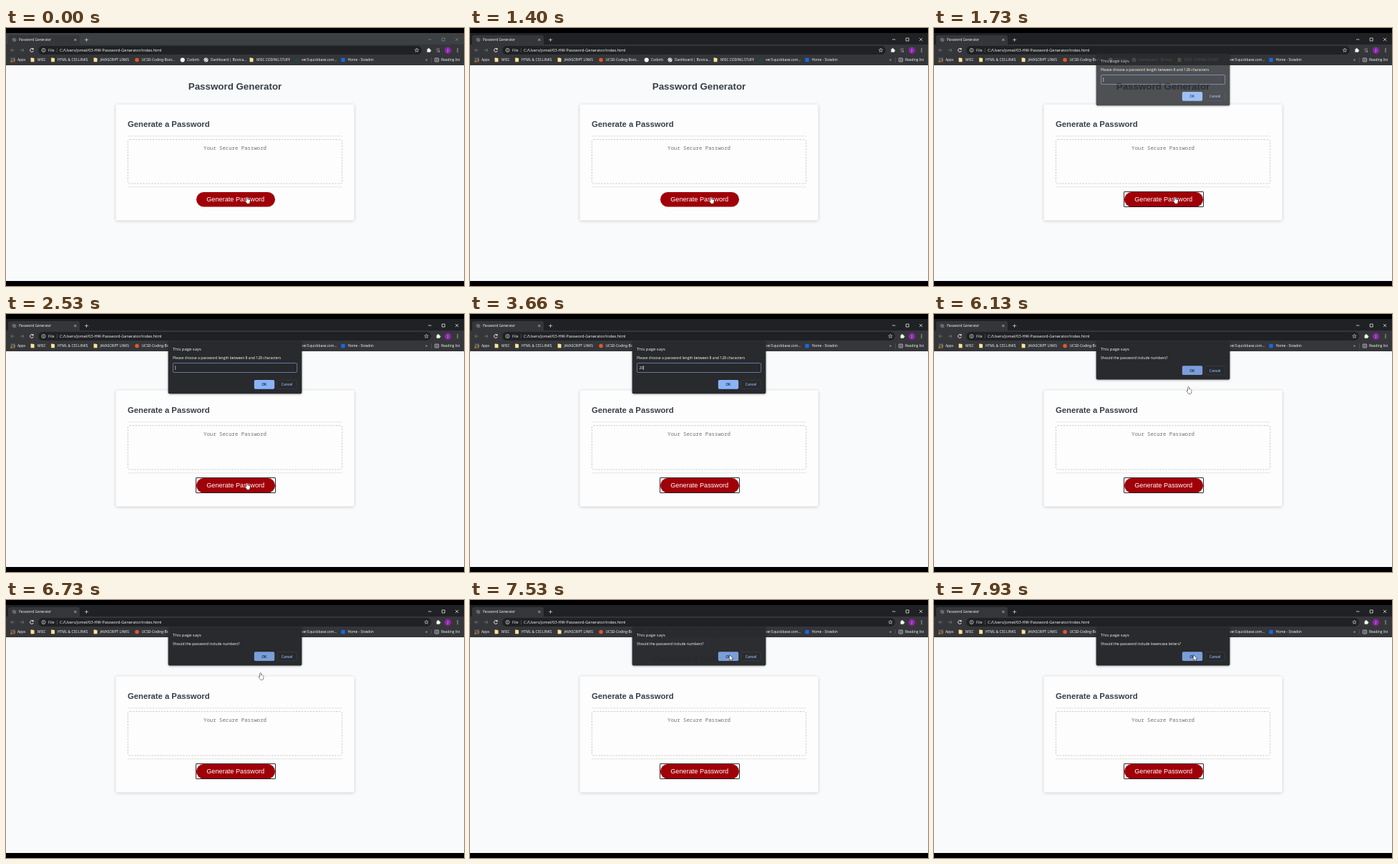
An HTML page with a canvas that plays this animation: 640 px wide and 360 px high, repeating every 8 s.

```html
<!DOCTYPE html>
<html lang="en">
<head>
<meta charset="utf-8">
<title>Password Generator</title>
<style>
html, body { margin: 0; width: 100%; height: 100%; overflow: hidden; background: #000; }
canvas { display: block; width: 640px; height: 360px; }
</style>
</head>
<body>
<canvas id="stage"></canvas>
<script>
const LOOP = 8000;
const UI = '"Open Sans", "Noto Sans", sans-serif';
const ARIAL = '"Liberation Sans", Arial, sans-serif';
const MONO = '"Noto Sans Mono", "DejaVu Sans Mono", monospace';

const ratio = window.devicePixelRatio || 1;

function prepare(canvas) {
  canvas.width = 640 * ratio;
  canvas.height = 360 * ratio;
  const context = canvas.getContext('2d');
  context.scale(ratio, ratio);
  return context;
}

const stage = prepare(document.getElementById('stage'));
const layer = prepare(document.createElement('canvas'));
let ctx = stage;

const clamp = v => Math.max(0, Math.min(1, v));
const ease = v => v * v * (3 - 2 * v);
const lerp = (a, b, p) => a + (b - a) * p;

function rect(x, y, w, h, color) {
  ctx.fillStyle = color;
  ctx.fillRect(x, y, w, h);
}

function box(x, y, w, h, r, fill, stroke, width = 0.7) {
  ctx.beginPath();
  ctx.roundRect(x, y, w, h, r);
  if (fill) { ctx.fillStyle = fill; ctx.fill(); }
  if (stroke) { ctx.strokeStyle = stroke; ctx.lineWidth = width; ctx.stroke(); }
}

function shadowBox(x, y, w, h, r, fill, shade, blur) {
  ctx.save();
  ctx.shadowColor = `rgba(0,0,0,${shade})`;
  ctx.shadowBlur = blur * ratio;
  ctx.shadowOffsetY = 0.7 * ratio;
  box(x, y, w, h, r, fill);
  ctx.restore();
}

function disc(x, y, r, fill) {
  ctx.beginPath();
  ctx.arc(x, y, r, 0, 7);
  ctx.fillStyle = fill;
  ctx.fill();
}

function ring(x, y, r, color, width = 0.7, from = 0, to = 7) {
  ctx.beginPath();
  ctx.arc(x, y, r, from, to);
  ctx.strokeStyle = color;
  ctx.lineWidth = width;
  ctx.stroke();
}

function line(color, width, ...pts) {
  ctx.beginPath();
  for (let i = 0; i < pts.length; i += 2) ctx.lineTo(pts[i], pts[i + 1]);
  ctx.strokeStyle = color;
  ctx.lineWidth = width;
  ctx.stroke();
}

function text(str, x, y, size, color, family = UI, weight = 400, align = 'left') {
  ctx.font = `${weight} ${size}px ${family}`;
  ctx.textAlign = align;
  ctx.fillStyle = color;
  ctx.fillText(str, x, y);
}

function globe(x, y, r, color, detail) {
  disc(x, y, r, color);
  ctx.beginPath();
  ctx.ellipse(x, y, r * 0.45, r * 0.8, 0.6, 0, 7);
  ctx.strokeStyle = detail;
  ctx.lineWidth = 0.6;
  ctx.stroke();
}

function folder(x) {
  box(x - 2.4, 41.4, 3, 2, 0.4, '#f3cf62');
  box(x - 2.4, 41.9, 4.9, 5.4, 0.4, '#fde293');
}

function star(x, y) {
  ctx.beginPath();
  for (let i = 0; i < 10; i++) {
    const a = -Math.PI / 2 + i * Math.PI / 5, r = i % 2 ? 1.3 : 2.8;
    ctx.lineTo(x + r * Math.cos(a), y + r * Math.sin(a));
  }
  ctx.closePath();
  ctx.strokeStyle = '#e8eaed';
  ctx.lineWidth = 0.6;
  ctx.stroke();
}

function puzzle(x, y) {
  box(x - 2.6, y - 1.7, 4.6, 4.5, 0.5, '#f1f3f4');
  disc(x - 0.3, y - 2, 1, '#f1f3f4');
  disc(x + 2.2, y + 0.5, 1, '#f1f3f4');
}

function drawTabs(active) {
  rect(0, 7, 640, 17, active ? '#202124' : '#3c4043');
  box(3, 10, 100, 15, [3, 3, 0, 0], '#35363a');
  globe(11.5, 16.5, 2.8, '#77797d', '#35363a');
  text('Password Generator', 18, 18.2, 4.75, '#fff');
  line('#dadce0', 0.7, 95.2, 14.9, 98.4, 18.1);
  line('#dadce0', 0.7, 98.4, 14.9, 95.2, 18.1);
  line('#dadce0', 0.7, 110, 16.5, 115, 16.5);
  line('#dadce0', 0.7, 112.5, 14, 112.5, 19);
  const tone = active ? '#fff' : '#85878a';
  line(tone, 0.7, 590, 16, 594.4, 16);
  ctx.strokeRect(609.2, 14, 4, 4);
  line(tone, 0.7, 628, 13.9, 632.2, 18.1);
  line(tone, 0.7, 632.2, 13.9, 628, 18.1);
}

function drawToolbar(shifted) {
  rect(0, 23, 640, 29, '#35363a');
  const dim = '#7b7d81';
  line(dim, 0.8, 11.8, 31, 6.8, 31);
  line(dim, 0.8, 9, 28.6, 6.6, 31, 9, 33.4);
  line(dim, 0.8, 19.8, 31, 24.8, 31);
  line(dim, 0.8, 22.6, 28.6, 25, 31, 22.6, 33.4);
  ring(36, 31, 2.4, '#f1f3f4', 0.9, 0.3, 5.5);
  rect(36.6, 28.3, 2, 1.9, '#f1f3f4');

  box(45, 25, shifted ? 549 : 536, 12, 6, '#202124');
  ring(52.5, 31, 2.5, '#e8eaed');
  line('#e8eaed', 0.7, 52.5, 30.6, 52.5, 32.5);
  rect(52.1, 29.3, 0.8, 0.7, '#e8eaed');
  text('File', 59, 33.1, 5.5, '#e8eaed');
  line('#77797d', 0.5, 71.3, 28.3, 71.3, 34);
  text('C:/Users/jomel/03-HW-Password-Generator/index.html', 75, 33.1, 5.57, '#fff');

  star(shifted ? 587.5 : 574, 31);
  puzzle(shifted ? 604.2 : 591, 31);
  if (!shifted) {
    for (const y of [29, 31, 33]) line('#a0a3a7', 0.7, 601.5, y, y < 32 ? 606 : 603.6, y);
    disc(605.3, 33, 1, '#a0a3a7');
  }
  disc(617.5, 31.2, 4.6, '#8e24aa');
  text('J', 617.5, 33, 5, '#fff', UI, 400, 'center');
  for (const y of [28.8, 31, 33.2]) disc(631, y, 0.65, '#e8eaed');
}

function drawBookmarks() {
  const dots = ['#ea4335', '#fbbc04', '#34a853', '#4285f4'];
  for (let i = 0; i < 9; i++)
    rect(6.6 + (i % 3) * 2.2, 41.6 + Math.floor(i / 3) * 2.2, 1.6, 1.6, dots[(i * 3 + (i >> 1)) % 4]);
  [37, 65.5, 125, 343].forEach(folder);
  disc(183, 44.5, 2.8, '#e2572b');
  disc(246.7, 44.5, 3.1, '#f5f5f5');
  globe(279.5, 44.5, 3, '#f1f3f4', '#35363a');
  disc(406.8, 44.5, 2.5, '#1d4b3c');
  rect(468.3, 41.8, 5.4, 5.4, '#1769e0');
  const labels = [
    ['Apps', 16], ['MISC', 44], ['HTML & CSS LINKS', 72], ['JAVASCRIPT LINKS', 131.5],
    ['UCSD-Coding-Boot...', 189.5], ['Codorb', 253], ['Dashboard | Bootca...', 286],
    ['MISC CODING STUFF', 350], ['ver3.quickbase.com...', 413], ['Home - Stowbin', 477.5],
    ['Reading list', 608]
  ];
  for (const [label, x] of labels) text(label, x, 46.3, 4.9, '#fff');
  text('»', 587.5, 46.3, 6, '#e8eaed', UI, 400, 'center');
  line('#5f6368', 0.5, 594.5, 41, 594.5, 48);
  box(599.2, 42, 5.4, 5, 0.6, null, '#dadce0', 0.7);
  for (const y of [43.6, 45.4]) line('#dadce0', 0.6, 600.4, y, 603.6, y);
}

function drawPage(focused) {
  rect(0, 52, 640, 301, '#f9fafb');
  text('Password Generator', 320, 85.8, 13.35, '#363e48', ARIAL, 700, 'center');

  shadowBox(153.5, 106.5, 333, 162, 2, '#fdfdfd', 0.2, 4);
  text('Generate a Password', 170, 138.2, 11.28, '#363e48', ARIAL, 700);
  line('#dddfe0', 0.8, 170, 150.8, 470, 150.8);
  line('#dddfe0', 0.8, 170, 221.8, 470, 221.8);
  ctx.setLineDash([2.4, 1.6]);
  box(170.3, 155.6, 299.4, 61.4, 2.5, null, '#bfc1c4', 0.8);
  ctx.setLineDash([]);
  text('Your Secure Password', 320, 169.8, 7.33, '#707070', MONO, 400, 'center');

  box(266, 229, 110, 20.5, 10.25, '#a00008');
  if (focused) box(265.5, 228.5, 111, 21, 0.5, null, '#151515', 0.9);
  text('Generate Password', 320.7, 242.2, 9.17, '#fff', ARIAL, 400, 'center');
}

function paintDialog(d, t) {
  shadowBox(226.6, 38, 186.8, d.bottom - 38, 2, '#292a2d', 0.35, 3);
  text('This page says', 233, 51, 5.95, '#f1f3f4');
  text(d.message, 233, 62.9, 5.1, '#fff');
  if (d.prompt) drawInput(t);

  const y = d.bottom - 19.3;
  box(346.8, y, 28.4, 12.8, 1.8, d.prompt ? '#8ab4f8' : '#7a9edb');
  text('OK', 360.7, y + 8.2, 5, '#202124', UI, 600, 'center');
  box(378.8, y + 0.2, 27.8, 12.4, 1.8, null, '#3c4043', 0.6);
  text('Cancel', 392.6, y + 8.2, 4.9, '#8ab4f8', UI, 600, 'center');
}

// Painted on its own layer so that the whole dialog fades as one.
function drawDialog(d, t) {
  const fadeIn = clamp((t - d.open) / 260);
  const fadeOut = clamp((t - d.close) / 66);
  layer.clearRect(0, 0, 640, 360);
  ctx = layer;
  paintDialog(d, t);
  ctx = stage;
  ctx.globalAlpha = (1 - (1 - fadeIn) ** 2.4) * (1 - fadeOut);
  ctx.drawImage(layer.canvas, 0, -6 * (1 - fadeIn), 640, 360);
  ctx.globalAlpha = 1;
}

function drawInput(t) {
  box(233.4, 68.5, 173.3, 13, 1.5, '#27282c', '#6f8fc0', 0.8);
  const typed = t < 3460 ? '' : t < 3660 ? '2' : '20';
  text(typed, 236.5, 76.9, 5.1, '#fff');
  const caretOff = [[2060, 2530], [3130, 3460], [4200, 4730], [5340, 5600]];
  if (!caretOff.some(([a, b]) => t >= a && t < b)) {
    const x = 236.7 + ctx.measureText(typed).width;
    line('#f1f3f4', 0.6, x, 72, x, 78);
  }
}

const dialogs = [
  { open: 1600, close: 5600, bottom: 111.3, prompt: true,
    message: 'Please choose a password length between 8 and 128 characters' },
  { open: 5800, close: 7530, bottom: 91.6, message: 'Should the password include numbers?' },
  { open: 7660, close: 9000, bottom: 91.6, message: 'Should the password include lowercase letters?' }
];

function shape(points, x, y) {
  ctx.beginPath();
  for (let i = 0; i < points.length; i += 2) ctx.lineTo(x + points[i], y + points[i + 1]);
  ctx.closePath();
  ctx.lineJoin = 'round';
  ctx.lineWidth = 1;
  ctx.strokeStyle = '#111';
  ctx.stroke();
  ctx.fillStyle = '#fff';
  ctx.fill();
}

const ARROW = [0, 0, 0, 7, 1.6, 5.5, 2.7, 8, 3.8, 7.5, 2.7, 5.1, 4.9, 5.1];
const HAND = [-0.6, 0.2, 0, -0.2, 0.6, 0.2, 0.7, 3.2, 2, 3.1, 3.1, 3.5, 4, 4, 4.2, 5.2,
  3.8, 7.3, 3.3, 9, -0.1, 9, -0.8, 7.5, -2.4, 5.3, -2, 4.6, -0.6, 5.6];

function drawCursor(t, dialog) {
  if (t >= 3460 && t < 4730) return;
  const up = ease(clamp((t - 4730) / 600));
  const next = ease(clamp((t - 6730) / 600));
  const x = lerp(lerp(336.8, 355.6, up), 362.6, next);
  const y = lerp(lerp(236, 102, up), 76.7, next);
  const over = dialog && y < dialog.bottom && x > 226 && x < 414;
  shape(over ? ARROW : HAND, x, y);
}

function draw(t) {
  rect(0, 0, 640, 360, '#000');
  drawTabs(t >= 1330);
  drawToolbar(t >= 1930);
  drawBookmarks();
  drawPage(t >= 1600);
  const dialog = dialogs.find(d => t >= d.open && t < d.close + 66);
  if (dialog) drawDialog(dialog, t);
  drawCursor(t, dialog);
}

const start = performance.now();
function tick() {
  draw((performance.now() - start) % LOOP);
  requestAnimationFrame(tick);
}
tick();
</script>
</body>
</html>
```
